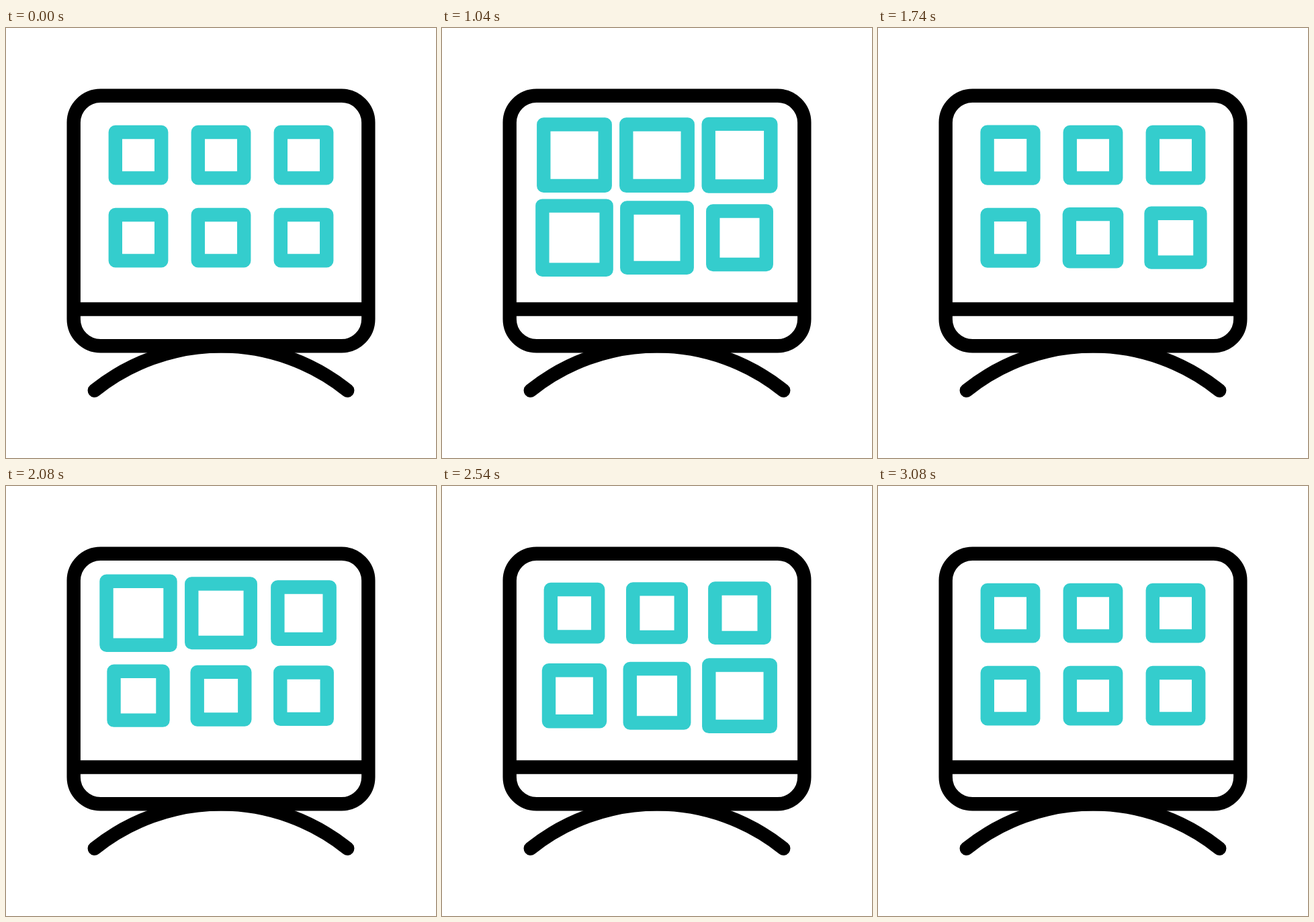
Animation, 640 px wide and 640 px high, one loop 3600 ms. Source, as an HTML page:

```html
<!DOCTYPE html>
<html>
<head>
<meta charset="utf-8">
<style>
  html, body { margin: 0; height: 100%; overflow: hidden; background: #fff; }
  svg { display: block; width: 100vw; height: 100vh; }
</style>
</head>
<body>
<svg viewBox="0 0 640 640" fill="none" stroke-width="20.4">
  <g stroke="#000">
    <rect x="100.7" y="100.7" width="438.6" height="372.6" rx="40"/>
    <path d="M101 418.5H539"/>
    <path d="M131.8 539.5A301 301 0 0 1 508.2 539.5" stroke-linecap="round"/>
  </g>
  <g id="tiles" stroke="#34cdcd" stroke-linejoin="round"></g>
</svg>
<script>
const LOOP = 3600, STAGGER = 60, SIDE = 68.4;

// Easing with horizontal handles: slow at an end where the handle is long.
function ease(u, x1, x2) {
  let lo = 0, hi = 1;
  for (let i = 0; i < 24; i++) {
    const p = (lo + hi) / 2, q = 1 - p;
    if (3 * q * q * p * x1 + 3 * q * p * p * x2 + p * p * p < u) lo = p;
    else hi = p;
  }
  return lo * lo * (3 - 2 * lo);
}

// Each key: time, growth in pixels, and the two handles leading up to it.
const keysFor = peak => [
  [430, 0],
  [880, peak, 1, 0.667],
  [1000, 23, 0.333, 0],
  [1050, 23, 0.333, 0.667],
  [1595, 0, 0.333, 0.667],
  [1650, 0, 0.333, 0.667],
  [2110, peak, 1, 0.667],
  [2820, 0, 0.333, 0]
];

function growth(keys, t) {
  const i = keys.findIndex(key => t < key[0]);
  if (i < 1) return 0;
  const [t0, from] = keys[i - 1];
  const [t1, to, x1, x2] = keys[i];
  return from + (to - from) * ease((t - t0) / (t1 - t0), x1, x2);
}

const group = document.getElementById("tiles");
const tiles = Array.from({ length: 6 }, (_, i) => {
  const path = document.createElementNS(group.namespaceURI, "path");
  group.append(path);
  return {
    path,
    x: 197 + 123 * (i % 3),
    y: 189.2 + 123 * Math.floor(i / 3),
    delay: i * STAGGER,
    keys: keysFor(i === 5 ? 31 : 27)
  };
});

function draw(now) {
  const t = now % LOOP;
  for (const { path, x, y, delay, keys } of tiles) {
    const side = SIDE + growth(keys, t - delay);
    path.setAttribute("d", `M${x - side / 2} ${y - side / 2}h${side}v${side}h${-side}z`);
  }
}

const start = performance.now();
function tick() {
  draw(performance.now() - start);
  requestAnimationFrame(tick);
}
tick();
</script>
</body>
</html>
```
